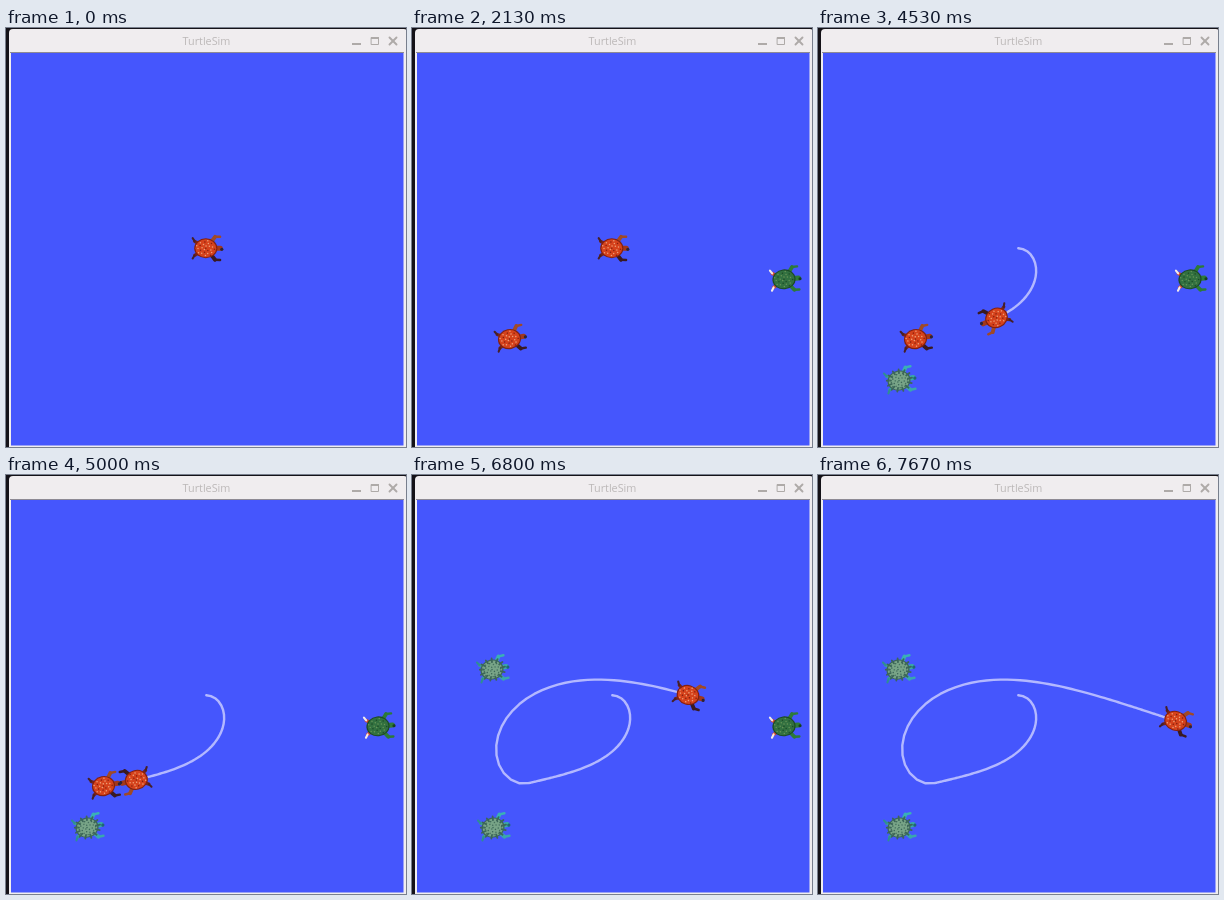
These frames come from a looping animation (400 by 419 pixels, 8000 ms). An HTML page with a canvas:

```html
<!DOCTYPE html>
<html lang="en">
<head>
<meta charset="utf-8">
<title>TurtleSim</title>
<style>
  html, body { margin: 0; width: 100%; height: 100%; overflow: hidden; background: #141218; }
  #stage { position: relative; width: 400px; height: 419px; overflow: hidden; }
  canvas { position: absolute; left: 0; top: 0; display: block; }
  #title {
    position: absolute; left: 0; top: 4px; width: 401px; text-align: center;
    font: 10.8px/17px "Open Sans", "Noto Sans", sans-serif; color: #bcb8b8;
  }
</style>
</head>
<body>
<div id="stage">
  <canvas id="view" width="400" height="419"></canvas>
  <div id="title">TurtleSim</div>
</div>
<script>
const ctx = document.getElementById('view').getContext('2d');
const LOOP = 8000, FPS = 15, STEPS = 4, TAU = Math.PI * 2;

// Ticks at which turtles appear, start moving and get caught
const T = { spawnRed: 2, spawnGreen: 32, chase1: 62, catch1: 80, chase2: 92, catch2: 115 };

const home = { x: 200.3, y: 220.3, a: 0 };
const prey1 = { x: 100, y: 312 };
const prey2 = { x: 374, y: 251.3 };

// Proportional controller: speed follows distance, turning follows bearing error
function chase(start, goal) {
  const dt = 1 / (FPS * STEPS), kLin = 2.05, kAng = 8.25, reach = 17.2;
  const path = [start];
  let { x, y, a } = start;
  for (let i = 0; i < 300; i++) {
    const dx = goal.x - x, dy = goal.y - y, dist = Math.hypot(dx, dy);
    if (dist < reach) break;
    const raw = Math.atan2(dy, dx) - a + 1;
    const turn = kAng * (raw - TAU * Math.floor(raw / TAU) - 1) * dt;
    const mid = a + turn / 2, step = kLin * dist * dt;
    x += Math.cos(mid) * step;
    y += Math.sin(mid) * step;
    a += turn;
    path.push({ x, y, a });
  }
  return path;
}
const leg1 = chase(home, prey1);
const leg2 = chase(leg1[leg1.length - 1], prey2);

function travelled(tick) {
  const part = (leg, from) => leg.slice(0, Math.max(0, tick - from) * STEPS + 1);
  return tick < T.chase2 ? part(leg1, T.chase1) : leg1.concat(part(leg2, T.chase2));
}

const kinds = {
  red: { rim: '#84200f', shell: '#d5421c', web: '#eda078', head: '#a2381c', eye: '#2c2336',
         left: '#a04a26', right: '#3a1a22', hind: '#7a2419', tip: '#45202a' },
  green: { rim: '#1d4a25', shell: '#327040', web: '#679457', head: '#2f7a3a', eye: '#163f20',
           left: '#2d7a38', right: '#2d7a38', hind: '#d2472c', tip: '#f2eaea' },
  teal: { rim: '#3c6658', shell: '#78a487', web: '#46705f', head: '#3aa8a8', eye: '#1f6674',
          left: '#3ab0b6', right: '#3aa6ae', hind: '#419f9c', tip: '#2f8d94', spikes: 13 }
};

function oval(color, x, y, rx, ry = rx) {
  ctx.fillStyle = color;
  ctx.beginPath();
  ctx.ellipse(x, y, rx, ry, 0, 0, TAU);
  ctx.fill();
}

function line(color, width, ...points) {
  ctx.strokeStyle = color;
  ctx.lineWidth = width;
  ctx.beginPath();
  for (const p of points) ctx.lineTo(p.x, p.y);
  ctx.stroke();
}

const polar = (angle, r, squash = 1) =>
  ({ x: Math.cos(angle) * r, y: Math.sin(angle) * r * squash });

// Limb leaving the shell at an angle, with its end bent towards the nose
function limb(color, tip, angle, length, width, bend) {
  const knee = polar(angle, length * 0.8), end = polar(angle - bend, length);
  line(color, width, polar(angle, 6), knee);
  line(tip, width * 0.65, knee, end);
}

function turtle(kind, x, y, a = 0) {
  const k = kinds[kind], squash = 0.86, size = 11.6;
  ctx.save();
  ctx.translate(x, y);
  ctx.rotate(a);

  for (const side of [-1, 1]) {
    const fore = side < 0 ? k.left : k.right;
    limb(k.hind, k.tip, side * 2.6, 17, 3.2, side * 0.1);
    limb(fore, fore, side * 0.92, 18, 3.8, side * 0.22);
  }
  line(k.head, 5, polar(0, 8), polar(0, 14));
  oval(k.eye, 15.5, 1, 1.6);

  oval(k.rim, -0.5, 0, size, size * squash);
  oval(k.shell, -0.5, 0, size - 1.2, (size - 1.2) * squash);
  for (let i = 0; i < (k.spikes || 0); i++) {
    const t = i / k.spikes * TAU;
    line(k.rim, 1.8, polar(t, size - 3, squash), polar(t, size + 1.2, squash));
  }

  // Scutes scattered over the dome in a golden-angle spiral
  for (let i = 0; i < 26; i++) {
    const p = polar(i * 2.4, 1.9 * Math.sqrt(i), squash);
    oval(i % 3 ? k.web : k.rim, p.x - 0.5, p.y, 0.75);
  }
  ctx.restore();
}

function rect(color, x, y, w, h) {
  ctx.fillStyle = color;
  ctx.fillRect(x, y, w, h);
}

function windowFrame() {
  const ink = '#aeaaa8';
  rect('#141218', 0, 0, 400, 419);
  ctx.fillStyle = '#f0edef';
  ctx.beginPath();
  ctx.roundRect(3, 1, 398, 420, [4, 3, 0, 0]);
  ctx.fill();
  rect('#8d8a94', 4, 24, 394, 1);
  rect('#4556fd', 5, 25, 392.5, 392.5);

  rect(ink, 346, 15, 9, 2);
  rect(ink, 365, 9, 8, 2);
  ctx.strokeStyle = ink;
  ctx.lineWidth = 1;
  ctx.strokeRect(365.5, 9.5, 7, 7);
  for (const s of [-1, 1]) {
    line(ink, 1.9, { x: 387 - 3.5 * s, y: 9.5 }, { x: 387 + 3.5 * s, y: 16.5 });
  }
}

function draw(ms) {
  const tick = Math.floor((ms + 5) * FPS / 1000);
  ctx.lineCap = ctx.lineJoin = 'round';
  windowFrame();

  const path = travelled(tick), me = path[path.length - 1];
  if (path.length > 1) line('#b3b8ff', 2.4, ...path);
  turtle('red', me.x, me.y, me.a);

  if (tick >= T.spawnRed && tick < T.catch1) turtle('red', 98, 311, -0.2);
  if (tick >= T.spawnGreen && tick < T.catch2) turtle('green', 372.5, 251.3, -0.1);
  if (tick >= T.chase1) turtle('teal', 81.5, 352.5, -0.22);
  if (tick >= T.chase2) turtle('teal', 80.5, 194.5, -0.22);
}

const begin = performance.now();
function loop() {
  draw((performance.now() - begin) % LOOP);
  requestAnimationFrame(loop);
}
loop();
</script>
</body>
</html>
```
